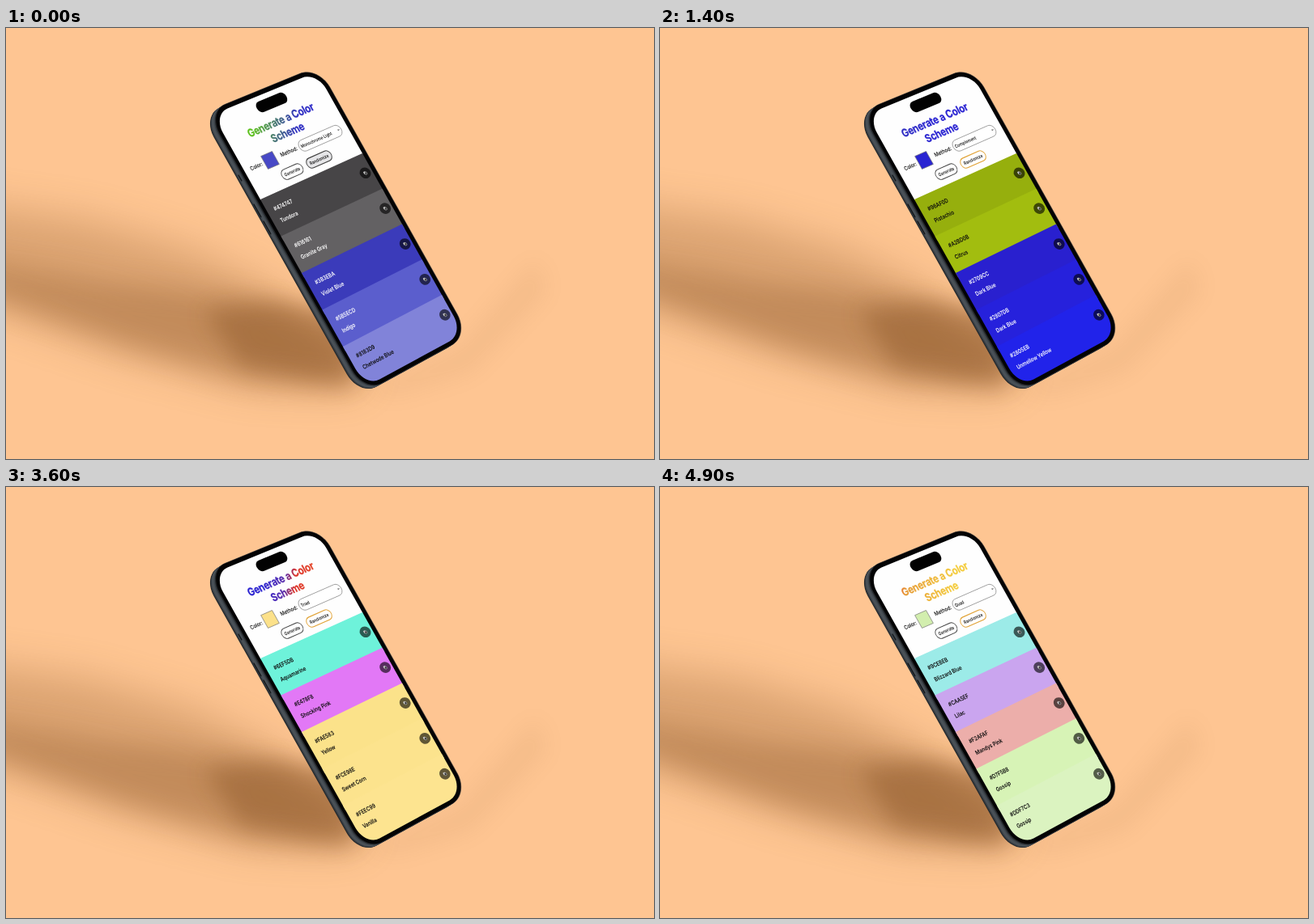
An HTML page that plays this animation: 800x533 px, repeating every 5000 ms.

```html
<!DOCTYPE html>
<html lang="en">
<head>
<meta charset="utf-8">
<title>Color scheme phone</title>
<style>
  html, body { margin: 0; width: 100%; height: 100%; overflow: hidden; background: #fec592; }
  svg { display: block; width: 100vw; height: 100vh; }
  text { font-family: Inter, Roboto, sans-serif; text-rendering: geometricPrecision; }
</style>
</head>
<body>
<svg id="stage" viewBox="0 0 800 533" preserveAspectRatio="none">
  <defs>
    <linearGradient id="ink" gradientUnits="userSpaceOnUse"></linearGradient>
    <filter id="soft" x="-50%" y="-50%" width="200%" height="200%"><feGaussianBlur stdDeviation="26"/></filter>
    <filter id="mid" x="-50%" y="-50%" width="200%" height="200%"><feGaussianBlur stdDeviation="17"/></filter>
    <filter id="near" x="-50%" y="-50%" width="200%" height="200%"><feGaussianBlur stdDeviation="14"/></filter>
    <clipPath id="glass"><path id="glassEdge"/></clipPath>
  </defs>
  <rect width="800" height="533" fill="#fec592"/>
  <g fill="#8a5526">
    <path d="M-90 212L100 238 230 275 330 325 450 430 420 446 300 442 150 404 -90 322Z" opacity=".3" filter="url(#soft)"/>
    <path d="M-90 280L120 315 300 332 420 375 430 445 300 438 150 394 -90 308Z" opacity=".3" filter="url(#mid)"/>
    <path d="M245 350L330 338 440 355 430 440 370 434 290 418Z" opacity=".45" filter="url(#near)"/>
    <path d="M440 445L560 395 655 285 668 325 575 425 480 455Z" opacity=".08" filter="url(#near)"/>
  </g>
  <g id="body"></g>
  <g id="screen" clip-path="url(#glass)"></g>
  <g id="island"></g>
</svg>
<script>
const NS = 'http://www.w3.org/2000/svg';
const W = 393, ROW = 113.6, TOP = -262, BOTTOM = 579;
const LOOP = 5000, STEP = 100;
const $ = id => document.getElementById(id);

// The screen plane: y = 0 is the top of the first row; both sides are straight lines.
const left = v => [314 + 25.5 * v, 212 + 45.5 * v];
const right = v => [440 + 24.5 * v, 155 + 43.75 * v];

function point(x, y) {
  const u = x / W, l = left(y / ROW), r = right(y / ROW);
  return [l[0] + u * (r[0] - l[0]), l[1] + u * (r[1] - l[1])];
}

// Flat approximation of the plane around (x, y), as an SVG matrix.
function plane(x, y) {
  const p = point(x, y);
  const q = point(x + 1, y), s = point(x, y + 1);
  const a = q[0] - p[0], b = q[1] - p[1], c = s[0] - p[0], d = s[1] - p[1];
  return `matrix(${[a, b, c, d, p[0] - a * x - c * y, p[1] - b * x - d * y]})`;
}

function add(parent, tag, attrs, text) {
  const el = document.createElementNS(NS, tag);
  for (const k in attrs) el.setAttribute(k, attrs[k]);
  if (text) el.textContent = text;
  return parent.appendChild(el);
}

function panel(x1, y1, x2, y2, r) {
  const k = r * 0.45;
  const at = (x, y) => point(x, y).map(n => n.toFixed(2)).join(' ');
  return `M${at(x1 + r, y1)}L${at(x2 - r, y1)}C${at(x2 - k, y1)} ${at(x2, y1 + k)} ${at(x2, y1 + r)}` +
    `L${at(x2, y2 - r)}C${at(x2, y2 - k)} ${at(x2 - k, y2)} ${at(x2 - r, y2)}` +
    `L${at(x1 + r, y2)}C${at(x1 + k, y2)} ${at(x1, y2 - k)} ${at(x1, y2 - r)}` +
    `L${at(x1, y1 + r)}C${at(x1, y1 + k)} ${at(x1 + k, y1)} ${at(x1 + r, y1)}Z`;
}

function label(x, y, size, weight, text, attrs) {
  return add(screen, 'text', { transform: plane(x, y), x, y, 'font-size': size, 'font-weight': weight, ...attrs }, text);
}

function pill(parent, cx, cy, w, h, attrs) {
  return add(parent, 'rect', {
    transform: plane(cx, cy), x: cx - w / 2, y: cy - h / 2, width: w, height: h, rx: h / 2, fill: '#fff', ...attrs
  });
}

const schemes = [
  { from: 0, method: 'Monochrome Light', swatch: '#4849c6', press: true, rows: [
    ['#474747', 'Tundora', '#474547', 1], ['#616161', 'Granite Gray', '#636163', 1],
    ['#3B3EBA', 'Violet Blue', '#3b3bba', 1], ['#5B5ECD', 'Indigo', '#5b5ecd', 1],
    ['#8183D9', 'Chetwode Blue', '#8183d9', 0]] },
  { from: 1200, method: 'Complement', swatch: '#2a25d2', rows: [
    ['#96AF0D', 'Pistachio', '#96af0d', 0], ['#A2BD0B', 'Citrus', '#a2bd0f', 0],
    ['#2709CC', 'Dark Blue', '#2920cf', 1], ['#2807DB', 'Dark Blue', '#2621dc', 1],
    ['#2805EB', 'Unmellow Yellow', '#2123ea', 1]] },
  { from: 2600, method: 'Triad', swatch: '#fce18a', rows: [
    ['#6EF5DB', 'Aquamarine', '#6ef2da', 0], ['#E478F8', 'Shocking Pink', '#e278f6', 0],
    ['#FAE583', 'Yellow', '#fbe28a', 0], ['#FCE98E', 'Sweet Corn', '#fce38d', 0],
    ['#FEEC99', 'Vanilla', '#fde490', 0]] },
  { from: 3800, method: 'Quad', swatch: '#d2eeae', rows: [
    ['#9CEBEB', 'Blizzard Blue', '#9cebe8', 0], ['#CAA5EF', 'Lilac', '#caa5ef', 0],
    ['#F2AFAF', 'Mandys Pink', '#ecaeaa', 0], ['#D7F5B8', 'Gossip', '#d7f3b6', 0],
    ['#DDF7C3', 'Gossip', '#dbf3c0', 0]] }
];

// Phone body
const body = $('body'), screen = $('screen');
const face = panel(-12, TOP - 13, W + 14, BOTTOM + 12, 68);
const sides = ['#23282c', '#343a40', '#444b51', '#4c5359', '#4a5157', '#434a50', '#3a4046', '#202427'];
sides.forEach((fill, i) => {
  const k = 1 - i / sides.length;
  add(body, 'path', { d: face, fill, transform: `translate(${-7 * k} ${4.5 * k})` });
});
add(body, 'path', { d: face, fill: '#030304', stroke: '#2c2e31', 'stroke-width': 0.6 });
[[287, 182, 8], [306, 218, 18], [318, 239, 18]].forEach(([x, y, len]) =>
  add(body, 'path', { d: `M${x} ${y}l${len * 0.49} ${len * 0.87}`, stroke: '#14181b', 'stroke-width': 1.4, 'stroke-linecap': 'round' }));
$('glassEdge').setAttribute('d', panel(0, TOP, W, BOTTOM, 56));

// Header
add(screen, 'path', { d: panel(-5, TOP - 5, W + 5, 2, 0), fill: '#fefefe' });
const titleTilt = plane(199, -150);
[['Generate a Color', -165.5], ['Scheme', -126.5]].forEach(([s, y]) =>
  label(199, y, 31.5, 700, s, {
    transform: titleTilt, 'text-anchor': 'middle', 'letter-spacing': '-0.02em',
    fill: 'url(#ink)', stroke: 'url(#ink)', 'stroke-width': 0.6
  }));
label(45, -81, 16, 500, 'Color:', { 'text-anchor': 'middle' });
const swatch = add(screen, 'rect', {
  transform: plane(97.5, -86.6), x: 76, y: -106.6, width: 43, height: 40, stroke: '#777', 'stroke-width': 1.6
});
label(170, -82, 16, 500, 'Method:', { 'text-anchor': 'middle' });
pill(screen, 289.6, -86.6, 160, 34, { stroke: '#8a8a8a', 'stroke-width': 1.8 });
const method = label(216, -82, 13, 500, '');
add(screen, 'path', { transform: plane(360, -87), d: 'M357 -89l3 3 3 -3', fill: 'none', stroke: '#333', 'stroke-width': 1.6 });
pill(screen, 146, -33.5, 78, 30, { stroke: '#444', 'stroke-width': 2.2 });
label(146, -28.8, 13.3, 500, 'Generate', { 'text-anchor': 'middle' });
const random = pill(screen, 249.5, -34, 92, 30, { 'stroke-width': 2.6 });
label(249.5, -29.3, 13.3, 500, 'Randomize', { 'text-anchor': 'middle' });

// Colour rows
const rows = [0, 1, 2, 3, 4].map(i => {
  const y = i * ROW;
  const band = add(screen, 'path', { d: panel(-5, y, W + 5, y + ROW + 14, 0) });
  const code = label(25, y + 45, 16.6, 600, '');
  const name = label(25, y + 81, 16.6, 600, '');
  const g = add(screen, 'g', { transform: plane(368, y + 53.5) + ` translate(368 ${y + 53.5})` });
  add(g, 'ellipse', { rx: 19, ry: 16, fill: '#000', 'fill-opacity': 0.62 });
  add(g, 'rect', { x: -5, y: -5, width: 7, height: 7, rx: 1, fill: '#ccc' });
  add(g, 'rect', { x: -2, y: -2, width: 7, height: 7, rx: 1, fill: '#333', stroke: '#ccc', 'stroke-width': 1.2 });
  return { band, code, name };
});

pill($('island'), 202, -231, 112, 33, { fill: '#020202' });

// Title gradient, measured in screen widths
const ink = $('ink'), SPAN = 3.2, TILT = 0.8;
const reach = W * SPAN / (1 + TILT * TILT);
const gradientBox = { x1: 0, y1: -167, x2: reach, y2: -167 + reach * TILT };
for (const k in gradientBox) ink.setAttribute(k, gradientBox[k]);
[[0.22, '#5cc01c'], [0.65, '#2e2ec0'], [1, '#2a24d2'], [1.82, '#2a22d0'], [2.04, '#5a2aa8'],
 [2.14, '#dc3026'], [2.4, '#e8502a'], [2.52, '#e69a34'], [3, '#f4cc3c']].forEach(([w, c]) =>
  add(ink, 'stop', { offset: w / SPAN, 'stop-color': c }));

let shown = null;
function showScheme(s) {
  if (s === shown) return;
  shown = s;
  method.textContent = s.method;
  swatch.setAttribute('fill', s.swatch);
  random.setAttribute('fill', s.press ? '#e6e6e8' : '#fff');
  random.setAttribute('stroke', s.press ? '#444' : '#e2a53c');
  s.rows.forEach(([code, name, fill, light], i) => {
    const r = rows[i], color = light ? '#fff' : '#0c0c0c';
    r.band.setAttribute('fill', fill);
    r.code.textContent = code;
    r.name.textContent = name;
    r.code.setAttribute('fill', color);
    r.name.setAttribute('fill', color);
  });
}

// Slow start, steady middle, quick finish.
const inkShift = sec => 0.44 * sec - 0.1 * (1 - Math.exp(-2 * sec)) + 0.3 * (sec / 5) ** 8;

function draw(ms) {
  const t = Math.floor(ms % LOOP / STEP) * STEP;
  showScheme(schemes.filter(s => s.from <= t).pop());
  ink.setAttribute('gradientTransform', `translate(${-inkShift(t / 1000) * W} 0)`);
}

const start = performance.now();
function tick() {
  draw(performance.now() - start);
  requestAnimationFrame(tick);
}
tick();
</script>
</body>
</html>
```
